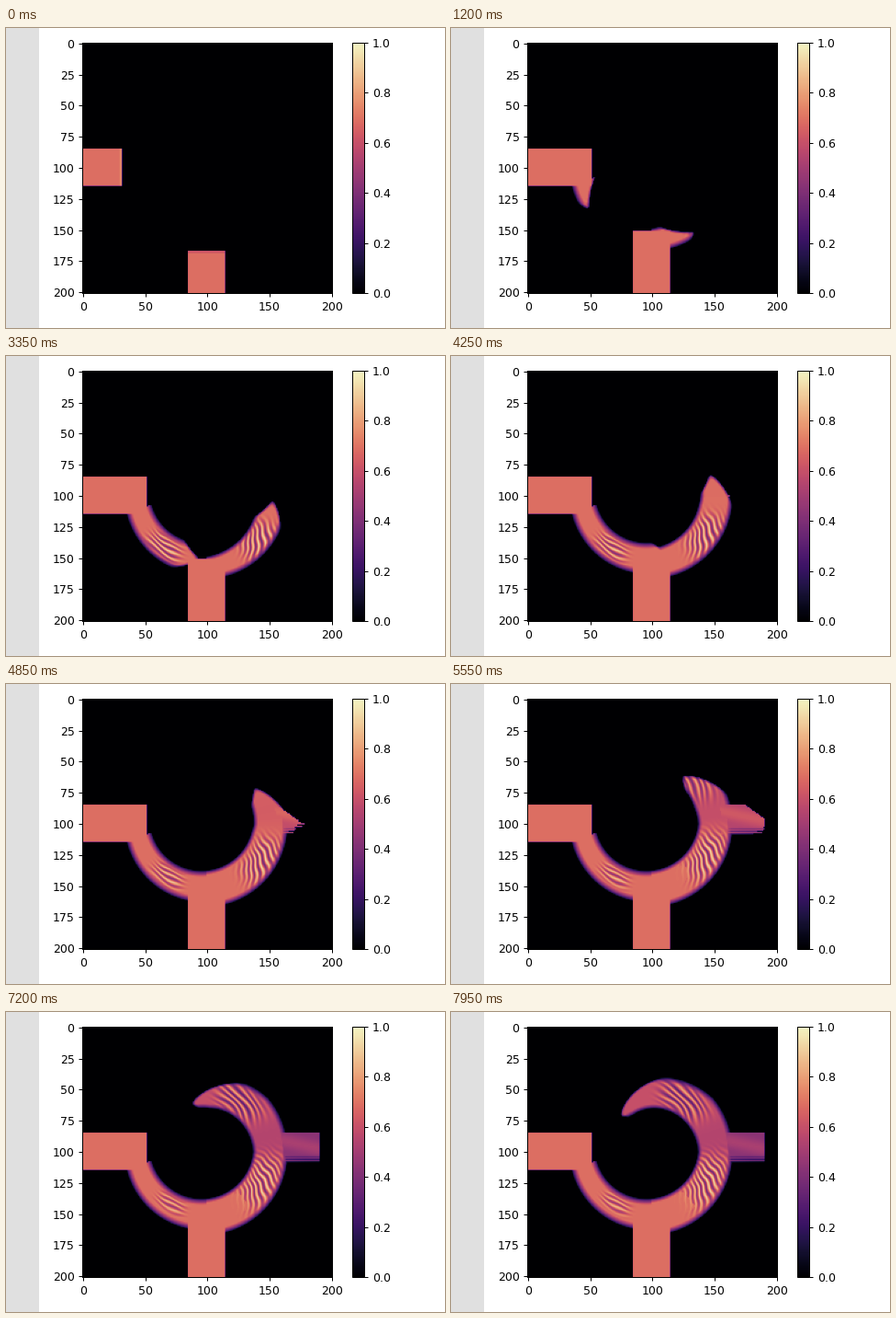
A matplotlib script that plays this animation: 478x326 px, repeating every 8 s.

```python
import numpy as np
import matplotlib.pyplot as plt
from matplotlib.animation import FuncAnimation
from matplotlib.colors import ListedColormap
from matplotlib.patches import Rectangle

W, H, DPI = 478, 326, 64
N, STEP, FRAMES = 201, 50, 160
PX = 72 / DPI  # points per pixel

plt.rcParams.update({
    "font.family": "DejaVu Sans", "font.size": 12.5 * PX,
    "axes.linewidth": 1.0 * PX,
    "xtick.major.width": 1.0 * PX, "ytick.major.width": 1.0 * PX,
    "xtick.major.size": 4.4 * PX, "ytick.major.size": 4.4 * PX,
    "xtick.major.pad": 4.4 * PX, "ytick.major.pad": 4.4 * PX,
})

# Slightly muted magma
rgb = plt.get_cmap("magma")(np.linspace(0, 1, 256))[:, :3]
grey = rgb @ [0.299, 0.587, 0.114]
cmap = ListedColormap(0.97 * (0.82 * rgb + 0.18 * grey[:, None]))

# Road geometry: polar angle is 0 at the bottom and grows towards the right
Y, X = np.mgrid[0:N, 0:N].astype(float)
DX, DY = X - 98, Y - 100
R = np.hypot(DX, DY)
PHI = np.degrees(np.arctan2(DX, DY))
TURN = PHI % 360
HOLE = np.hypot(X - 95.5, Y - 96)  # distance from the island's centre
KERB = 41.5 - 0.12 * np.maximum(np.where(PHI < -90, TURN, PHI) - 90, 0)
FULL = 0.69


def clip01(a):
    return np.clip(a, 0, 1)


def lerp(a, b, u):
    return a + (b - a) * u


def bump(a, mid, half):
    return np.exp(-np.abs((a - mid) / half) ** 4)


def stripes(phi, mid, half, r_mid, r_half, tilt, wave, t):
    """Tilted density waves, limited to a patch of the ring."""
    arc = np.radians(phi) * 52
    a = np.radians(tilt)
    wobble = 0.6 * np.sin(arc / 7 + R / 4) + 0.5 * np.sin(R / 2.3 - arc / 5)
    phase = arc * np.cos(a) + (R - 50) * np.sin(a) + wobble - 0.003 * t
    patch = bump(phi, mid, half) * bump(R, r_mid, r_half)
    return patch * (np.sin(2 * np.pi * phase / wave) - 0.15)


def stream(phi, kerb, r_out, tip, r_tip, slope, soft_in, soft_out):
    """Filled share of a lane whose pointed front has reached angle tip."""
    lead = tip - phi - slope * (np.hypot(R - r_tip, 2) - 2)
    inner = clip01((HOLE - kerb) / soft_in) ** 0.7
    outer = clip01((r_out - R) / soft_out) ** 0.7
    return inner * outer * clip01(lead / 4) ** 0.5


def left_lane(t, tip, r_tip):
    u = clip01((t - 2300) / 3900)
    body = stream(PHI, KERB, 64.5 - 0.02 * (PHI + 76),
                  tip - 91, min(r_tip - 4, 60), 1.8, 5, 5)
    wave = stripes(PHI, lerp(-40, -33, u), lerp(17, 14, u),
                   lerp(54, 50, u), lerp(9, 6, u),
                   lerp(45, 85, clip01((t - 2300) / 1000)), 3.6, t)
    shown = (PHI > -80) & (PHI < 40)
    return body * shown * (FULL + lerp(0.3, 0.2, u) * wave)


def lower_lane(t, tip, r_tip):
    u = clip01((t - 2300) / 4000)
    late = clip01((t - 4200) / 2000)
    # The lane widens to the kerb once the other stream has joined it
    merged = clip01((t - 3350 - 25 * np.maximum(TURN - 80, 0)) / 1500)
    kerb = lerp(53 - 0.09 * TURN, KERB, merged)
    body = stream(TURN, kerb, 67 - 0.15 * np.maximum(TURN - 130, 0), tip, r_tip,
                  lerp(1.8, 2.2, clip01((t - 6200) / 1700)), 3.5, 4.5)
    shown = (TURN > 13) | ((TURN > 2) & (Y < 152))
    base = FULL - 0.09 * late * clip01((TURN - 70) / 25)
    base = base - 0.05 * late * bump(TURN, 103, 16)
    wave = stripes(TURN, lerp(46, 63, u), lerp(14, 25, u),
                   lerp(57, 52, u), lerp(9, 12, u), lerp(48, 38, u), 4.3, t)
    top = clip01((t - 5000) / 700) * stripes(
        TURN, lerp(137, 147, clip01((t - 6200) / 1200)), 23,
        50, 11, 105, 4.5, t)
    return body * shown * (base + 0.28 * wave + 0.27 * top)


def exit_road(t):
    """Traffic leaving to the right behind a slanted front."""
    go = 0.027 * (t - 4850)
    front = np.minimum(155 + 1.4 * (Y - 84), 178 - 1.4 * (Y - 99)) + go
    jag = 3 * np.sin(Y * 2.6)
    road = (X > 150) & (Y > 84) & (Y <= 108.5) & (X < front + jag * (Y > 97))
    road &= (X <= 190) & (R > 58) & (t > 3900)
    level = lerp(0.63, 0.48, clip01((t - 5000) / 2200))
    value = level + 0.04 * np.sin((Y - 84) / 3 - (X - 150) / 14)
    low = clip01((Y - 102) / 6) * clip01((X - 158) / 6)
    return road * (value - 0.1 * low - 0.28 * low * (Y % 2 == 0))


def density(t):
    d = t - 2300
    tip = 59.5 + 0.0238 * d + 7.5e-7 * d * d
    r_tip = min(59 - 0.0039 * d, 63)
    z = np.maximum(left_lane(t, tip, r_tip), lower_lane(t, tip, r_tip))
    z = np.maximum(z, exit_road(t))

    # Straight approach roads
    x_end = min(52, 32 + 0.022 * t)
    y_end = max(151, 167 - 0.022 * t)
    left = (Y > 84) & (Y < 115) & (X < x_end)
    lower = (X > 84) & (X < 115) & (Y >= y_end)
    z[left | lower] = FULL
    if x_end < 52:
        z[left & (X >= x_end - 2)] = 0.74
    if y_end > 151:
        z[lower & (Y < y_end + 2)] = 0.63
    return clip01(z)


def box(x0, y0, w, h):
    return [x0 / W, 1 - (y0 + h) / H, w / W, h / H]


fig = plt.figure(figsize=(W / DPI, H / DPI), dpi=DPI, facecolor="white")
fig.add_artist(Rectangle((0, 0), 36 / W, 1, transform=fig.transFigure,
                         facecolor="#e0e0e0", edgecolor="none"))
ax = fig.add_axes(box(83.4, 16, 272, 272))
img = ax.imshow(density(0), cmap=cmap, vmin=0, vmax=1, aspect="auto")
ax.set_xticks(range(0, 201, 50))
ax.set_yticks(range(0, 201, 25))
bar = fig.colorbar(img, cax=fig.add_axes(box(377.2, 16, 12.8, 272)))
bar.set_ticks(np.linspace(0, 1, 6))

HOLDS = {17: 1, 140: 1, 141: 2}  # short stalls in the playback


def update(i):
    img.set_data(density((i - HOLDS.get(i, 0)) * STEP))
    return [img]


anim = FuncAnimation(fig, update, frames=FRAMES, interval=STEP,
                     repeat=True, repeat_delay=0)
plt.show()
```
